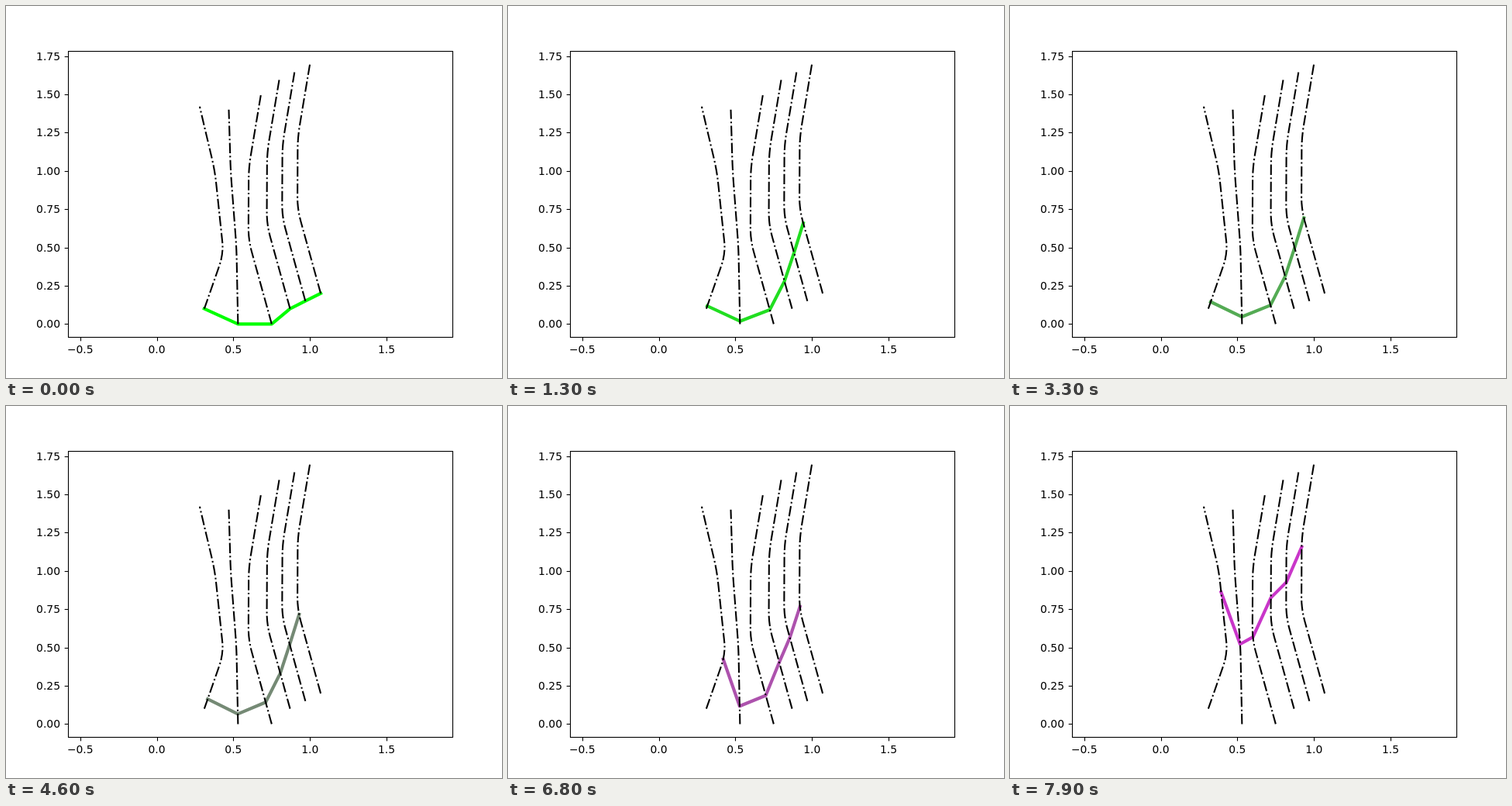
These frames come from a looping animation (640 by 480 pixels, 8000 ms). An HTML page:

```html
<!DOCTYPE html>
<html lang="en">
<head>
<meta charset="utf-8">
<title>Points moving along six paths</title>
<style>
  html, body { margin: 0; width: 100%; height: 100%; overflow: hidden; background: #fff; }
  svg { display: block; width: 640px; height: 480px; }
  text { font: 13.89px "DejaVu Sans", sans-serif; }
</style>
</head>
<body>
<svg viewBox="0 0 640 480">
  <polyline id="link" fill="none" stroke-width="4.17" stroke-linecap="square" stroke-linejoin="round"/>
  <g id="paths" fill="none" stroke="#000" stroke-width="2.083" stroke-dasharray="13.33 3.33 2.083 3.33"/>
  <g id="axes" fill="none" stroke="#000" stroke-width="1.11">
    <rect x="80.5" y="58.5" width="496" height="369"/>
  </g>
  <g id="labels"/>
</svg>
<script>
const SCALE = 197.647, STEP = 100, STEPS = 80;
const BLEND = 0.08;                  // half height of a rounded path corner
const RUSH = 0.042, CLIMB = 0.04;    // speeds per step before and after the drift
const SOFTNESS = 0.055;              // how gently the drift turns into the climb

const px = x => 194.59 + x * SCALE;
const py = y => 410.4 - y * SCALE;
const snap = v => Math.floor(v + 0.5) + 0.5;
const byId = id => document.getElementById(id);
const softMax = (a, b) => (a + b + Math.hypot(a - b, SOFTNESS)) / 2;

function add(parent, name, attrs, text = "") {
  const node = document.createElementNS("http://www.w3.org/2000/svg", name);
  for (const key in attrs) node.setAttribute(key, attrs[key]);
  node.textContent = text;
  byId(parent).append(node);
}

// Corners of a path from bottom to top; the right-hand paths share one shape
const bent = (x, y) => [[x, y], [x - 0.152, y + 0.55], [x - 0.15, y + 1.02], [x - 0.07, y + 1.5]];

// rest: height where the drift begins, end: height at the last step
const tracks = [
  { knots: [[0.31, 0.1], [0.436, 0.46], [0.379, 1], [0.28, 1.42]], rest: 0.1, end: 0.86 },
  { knots: [[0.53, 0], [0.52, 0.5], [0.482, 1], [0.47, 1.4]], rest: 0, end: 0.52 },
  { knots: bent(0.75, 0), rest: 0.073, end: 0.566 },
  { knots: bent(0.87, 0.1), rest: 0.259, end: 0.823 },
  { knots: bent(0.97, 0.15), rest: 0.444, end: 0.923 },
  { knots: bent(1.07, 0.2), rest: 0.637, end: 1.154 }
];

// Rush to the resting height, drift slowly, then climb to the end
function heightAt({ knots, rest, end }, index, step) {
  const drift = 0.00135 + 0.00007 * index;
  const settled = Math.min(knots[0][1] + RUSH * step, rest + drift * step);
  return softMax(settled, end - CLIMB * (STEPS - 1 - step));
}

// Straight pieces joined by parabolas around each inner corner
function xAt(knots, y) {
  const slope = i => (knots[i + 1][0] - knots[i][0]) / (knots[i + 1][1] - knots[i][1]);
  for (const i of [1, 2]) {
    const [kx, ky] = knots[i], d = y - ky;
    if (d < -BLEND) return kx + slope(i - 1) * d;
    if (d <= BLEND) {
      const bend = slope(i) - slope(i - 1);
      return kx + slope(i - 1) * d + bend * (d + BLEND) ** 2 / (4 * BLEND);
    }
  }
  return knots[2][0] + slope(2) * (y - knots[2][1]);
}

function drawPath({ knots }) {
  const point = (x, y) => px(x).toFixed(2) + " " + py(y).toFixed(2);
  let d = "M" + point(...knots[0]);
  for (const [x, y] of knots.slice(1, 3)) {
    const low = y - BLEND, high = y + BLEND;
    d += "L" + point(xAt(knots, low), low) + "Q" + point(x, y) + " " + point(xAt(knots, high), high);
  }
  add("paths", "path", { d: d + "L" + point(...knots[3]) });
}

function drawAxes() {
  for (let v = -0.5; v <= 1.5; v += 0.5) {
    add("axes", "path", { d: `M${snap(px(v))} 427.5v4.86` });
    add("labels", "text", { x: px(v), y: 448, "text-anchor": "middle" }, v.toFixed(1).replace("-", "\u2212"));
  }
  for (let v = 0; v <= 1.75; v += 0.25) {
    add("axes", "path", { d: `M80.5 ${snap(py(v))}h-4.86` });
    add("labels", "text", { x: 70, y: Math.round(py(v)) + 5, "text-anchor": "end" }, v.toFixed(2));
  }
}

function render(ms) {
  const step = Math.floor(ms / STEP) % STEPS;
  const points = tracks.map((track, index) => {
    const y = heightAt(track, index, step);
    return px(xAt(track.knots, y)).toFixed(2) + "," + py(y).toFixed(2);
  });
  const c = Math.round(255 * step / 100);
  byId("link").setAttribute("points", points.join(" "));
  byId("link").setAttribute("stroke", `rgb(${c},${255 - c},${c})`);
}

drawAxes();
tracks.forEach(drawPath);
render(0);
const start = performance.now();
function tick() {
  render(performance.now() - start);
  requestAnimationFrame(tick);
}
requestAnimationFrame(tick);
</script>
</body>
</html>
```
